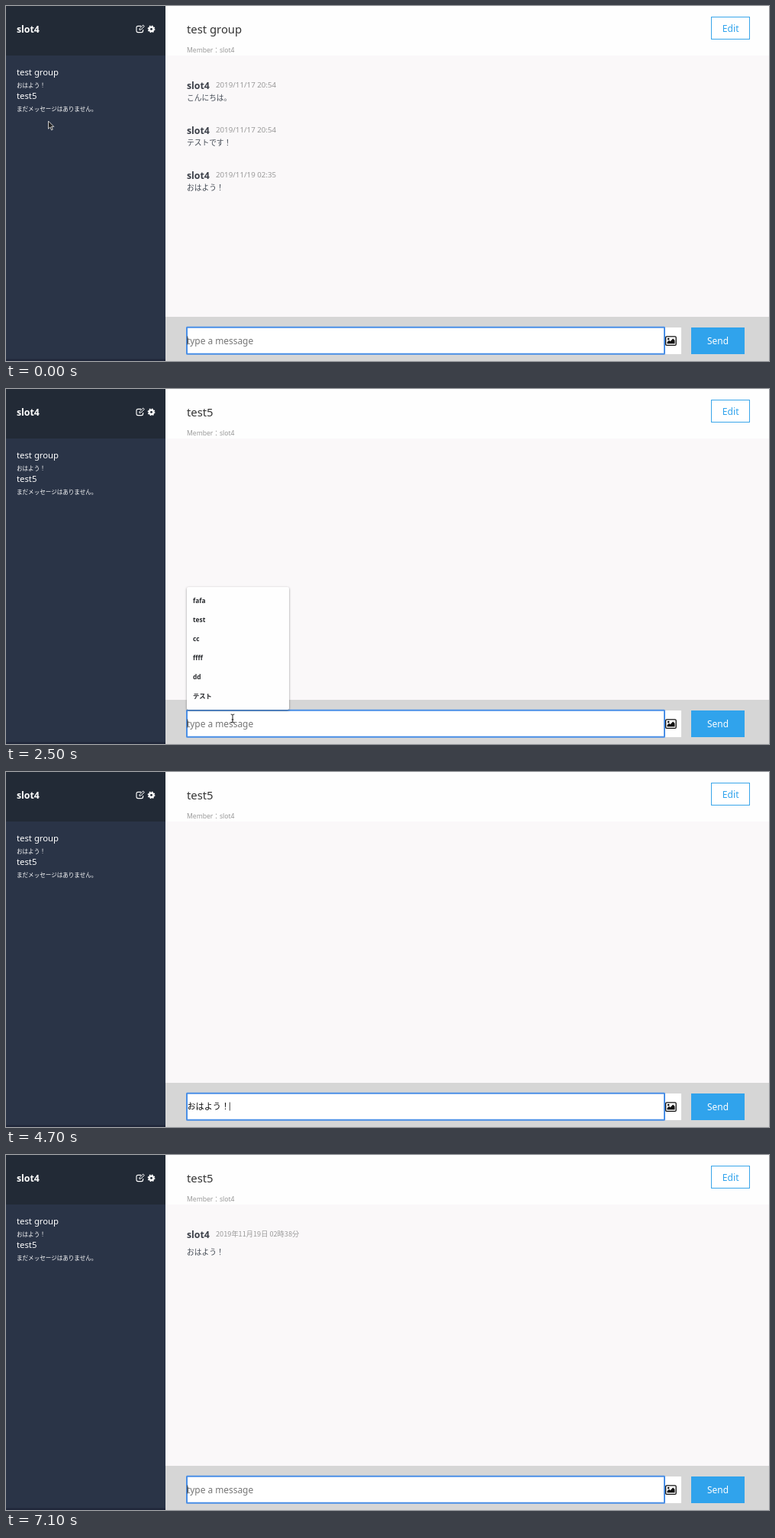
These frames come from a looping animation (1000x466 px, 7300 ms). An HTML page:

```html
<!DOCTYPE html>
<html lang="ja">
<head>
<meta charset="utf-8">
<title>Chat</title>
<style>
  html, body { margin: 0; width: 100%; height: 100%; overflow: hidden; background: #faf8f9; }
  svg { display: block; width: 100vw; height: 100vh; font-family: "Noto Sans", "Noto Sans CJK JP", sans-serif; }
  text { white-space: pre; }
  .side { fill: #fff; }
  .room { font-size: 11.3px; }
  .last { font-size: 7.55px; font-weight: 500; }
  .title { font-size: 14.8px; fill: #333; }
  .name { font-size: 12.3px; font-weight: 700; fill: #3b3f48; }
  .date { font-size: 9.72px; fill: #999; }
  .long { font: 9.2px "Noto Sans CJK JP", sans-serif; }
  .body { font-size: 9.72px; fill: #434a54; }
  .item { font-size: 8.3px; font-weight: 700; fill: #26282c; }
  .panel { fill: #fefefe; filter: drop-shadow(0 1px 1.5px #0006); }
  .field { font-size: 11.9px; }
  .pointer { stroke: #000; stroke-width: .9; stroke-linejoin: round; fill: #fff; }
</style>
</head>
<body>
<svg viewBox="0 0 1000 466" preserveAspectRatio="none">
  <!-- layout -->
  <rect width="1000" height="466" fill="#faf8f9"/>
  <rect x="209" width="791" height="65" fill="#fefefe"/>
  <rect x="209" y="408" width="791" height="58" fill="#d6d6d6"/>
  <rect width="209" height="466" fill="#2a3447"/>
  <rect width="209" height="65" fill="#222a36"/>
  <rect y="463.5" width="209" height="2.5" fill="#20273a"/>

  <!-- sidebar -->
  <g class="side">
    <text x="14" y="34.5" font-size="12.3" font-weight="700">slot4</text>
    <text class="room" x="14" y="90.5">test group</text>
    <text class="last" x="14" y="106.8">おはよう！</text>
    <text class="room" x="14" y="122">test5</text>
    <text class="last" x="14" y="138">まだメッセージはありません。</text>
  </g>
  <g fill="none" stroke="#fff">
    <path d="M177 26.4h-4a2 2 0 0 0-2 2v4.200a2 2 0 0 0 2 2h4.600a2 2 0 0 0 2-2v-1.500" stroke-width="1.100"/>
    <path d="M174.800 31.400l.4-1.900 4.500-4.500 1.600 1.600-4.500 4.500z" stroke-width="1"/>
    <circle cx="190.500" cy="30.300" r="2.700" stroke-width="2.400"/>
    <circle cx="190.500" cy="30.300" r="4.200" stroke-width="1.400" stroke-dasharray="1.650"/>
  </g>

  <!-- chat header -->
  <text class="title" x="237" y="36" data-on="0 1400">test group</text>
  <text class="title" x="237" y="36" data-on="1400 7300">test5</text>
  <text x="237" y="60.500" font-size="8.6" fill="#999">Member：slot4</text>
  <rect x="924.500" y="14.500" width="50" height="29" fill="#fff" stroke="#3aa6ea"/>
  <text x="949.700" y="34" font-size="12.2" fill="#30a3ec" text-anchor="middle">Edit</text>

  <g id="history" data-on="0 1400"></g>
  <g data-on="5200 7300">
    <text class="name" x="237" y="109">slot4</text>
    <text class="date long" x="275" y="106.500">2019年11月19日 02時38分</text>
    <text class="body" x="237" y="130.700">おはよう！</text>
  </g>

  <!-- form -->
  <rect x="237" y="422" width="648" height="35" fill="#fff"/>
  <g fill="none" stroke="#111" stroke-width="1.300">
    <rect x="864.600" y="433.900" width="13.600" height="11.400" rx="1.400"/>
    <path d="M866.500 443.300v-2l2.600-2.600 1.500 1.500 3.600-3.600 2.300 2.400v4.300z" fill="#111" stroke="none"/>
    <circle cx="868.200" cy="437.100" r="1.300" fill="#111" stroke="none"/>
  </g>
  <rect x="898" y="422" width="70" height="35" fill="#30a3ec"/>
  <text x="933" y="443.500" font-size="11.9" fill="#fff" text-anchor="middle">Send</text>
  <rect x="237" y="421.800" width="626" height="35" fill="none" stroke="#4a8fe6" stroke-width="2" rx=".5" data-on="0 900 2300 7300"/>
  <text class="field" x="237" y="443.500" fill="#757575" data-on="0 2900 5200 7300">type a message</text>
  <text id="typed" class="field" x="237.500" y="443.300" fill="#111" style="font-size:11.1px"></text>
  <path id="underline" stroke="#111"/>
  <path id="caret" stroke="#333" stroke-width=".9"/>

  <!-- suggestions -->
  <g id="recent" data-on="2400 2900"></g>
  <g id="matches" data-on="3000 4700"></g>
  <g data-on="3500 4300">
    <rect x="233" y="320.500" width="110" height="109" rx="3" fill="#fefefe" style="filter:drop-shadow(0 2px 4px #0007)"/>
    <text x="237" y="333.300" font-size="11" font-weight="700" fill="#111" id="guess" style="font-family:'Noto Serif CJK JP','Noto Sans CJK JP',serif"></text>
    <text x="288" y="424.300" font-size="6.500" fill="#777" text-anchor="middle">Tabキーで予測された単語を選択</text>
  </g>

  <!-- browser status -->
  <g data-on="700 1600">
    <path d="M-2 468V457H330q3 0 3 3v8z" fill="#e9e9eb" stroke="#aaa" stroke-width=".7"/>
    <text x="2" y="466" font-size="7.700" fill="#555">chatspaceapp.herokuapp.com を待機しています...</text>
  </g>

  <!-- pointers, each drawn around its hot spot -->
  <g id="mouse" class="pointer" data-on="0 2900">
    <path id="arrow" d="M0 0v10.200l2.400-2.200 1.700 3.900 1.700-.8-1.700-3.700h3.200z" style="fill:#222;stroke:#ddd"/>
    <path id="hand" d="M-1 0q1-.9 1.900 0V4.200l4.200 1q1 .3.800 1.600L5.200 10.800H-.2L-3 6.800q-.2-1.500 1.200-1.100L-1 6.300z"/>
    <path id="beam" d="M-2.300-5.500q2 0 2.300 1.200.3-1.200 2.300-1.200M0-4.300V4.300M-2.300 5.500q2 0 2.300-1.200.3 1.200 2.300 1.200M-1.300 1.500h2.600" fill="none"/>
  </g>
</svg>
<script>
const LOOP = 7300, STEP = 100;
const $ = id => document.getElementById(id);
const label = (cls, x, y, s) => `<text class="${cls}" x="${x}" y="${y}">${s}</text>`;

const history = [
  ['2019/11/17 20:54', 'こんにちは。'],
  ['2019/11/17 20:54', 'テストです！'],
  ['2019/11/19 02:35', 'おはよう！']
];
$('history').innerHTML = history.map(([date, body], i) => {
  const y = 109 + i * 59;
  return label('name', 237, y, 'slot4') + label('date', 275, y - 2.5, date) + label('body', 237, y + 14.5, body);
}).join('');

function fillPanel(id, items) {
  const h = items.length * 25 + 11, top = 421 - h;
  $(id).innerHTML = `<rect class="panel" x="237" y="${top}" width="134" height="${h}" rx="2"/>` +
    items.map((s, i) => label('item', 245, top + 20.8 + i * 25, s)).join('');
}
fillPanel('recent', ['fafa', 'test', 'cc', 'ffff', 'dd', 'テスト']);
fillPanel('matches', ['おはよう', 'おはようございます！', 'おはよう！']);

const typing = [
  [0, ''], [2900, 'ｏ'], [3000, 'お'], [3300, 'おｈ'], [3400, 'おは'], [3600, 'おはｙ'],
  [3700, 'おはよ'], [3900, 'おはよう'], [4300, 'おはよう！'], [5200, '']
];
const COMMIT = 4700;

// time, x, y of the pointer
const path = [[0, 55.5, 151], [200, 55.5, 151], [700, 33, 115.5], [1500, 33, 115.5], [2200, 297, 432.5], [LOOP, 297, 432.5]];

const timed = [...document.querySelectorAll('[data-on]')].map(el => ({ el, on: el.dataset.on.split(' ').map(Number) }));
const show = (el, on) => { el.style.display = on ? '' : 'none'; };
const within = (on, t) => on.filter(edge => edge <= t).length % 2 === 1;
const ease = p => p * p * (3 - 2 * p);

function movePointer(t) {
  const i = path.findIndex(p => p[0] > t);
  const [t0, x0, y0] = path[i - 1], [t1, x1, y1] = path[i];
  const p = ease((t - t0) / (t1 - t0));
  const x = x0 + (x1 - x0) * p, y = y0 + (y1 - y0) * p;
  const kind = y > 422 ? 'beam' : t >= 700 && t <= 1500 ? 'hand' : 'arrow';
  $('mouse').setAttribute('transform', `translate(${x} ${y})`);
  for (const id of ['arrow', 'hand', 'beam']) show($(id), id === kind);
}

function writeField(t) {
  const text = typing.filter(k => k[0] <= t).pop()[1];
  const typed = $('typed');
  typed.textContent = $('guess').textContent = text;
  const end = 237.5 + (text ? typed.getComputedTextLength() : 0);
  $('caret').setAttribute('d', `M${end + .3} 433.500v11`);
  $('underline').setAttribute('d', `M237.500 445H${end}`);
  show($('caret'), t < 900 || t >= 2300);
  show($('underline'), text && t < COMMIT);
}

function draw(t) {
  for (const { el, on } of timed) show(el, within(on, t));
  movePointer(t);
  writeField(t);
}

const start = performance.now();
function tick() {
  const t = Math.max(0, performance.now() - start) % LOOP;
  draw(Math.floor(t / STEP) * STEP);
  requestAnimationFrame(tick);
}
tick();
</script>
</body>
</html>
```
